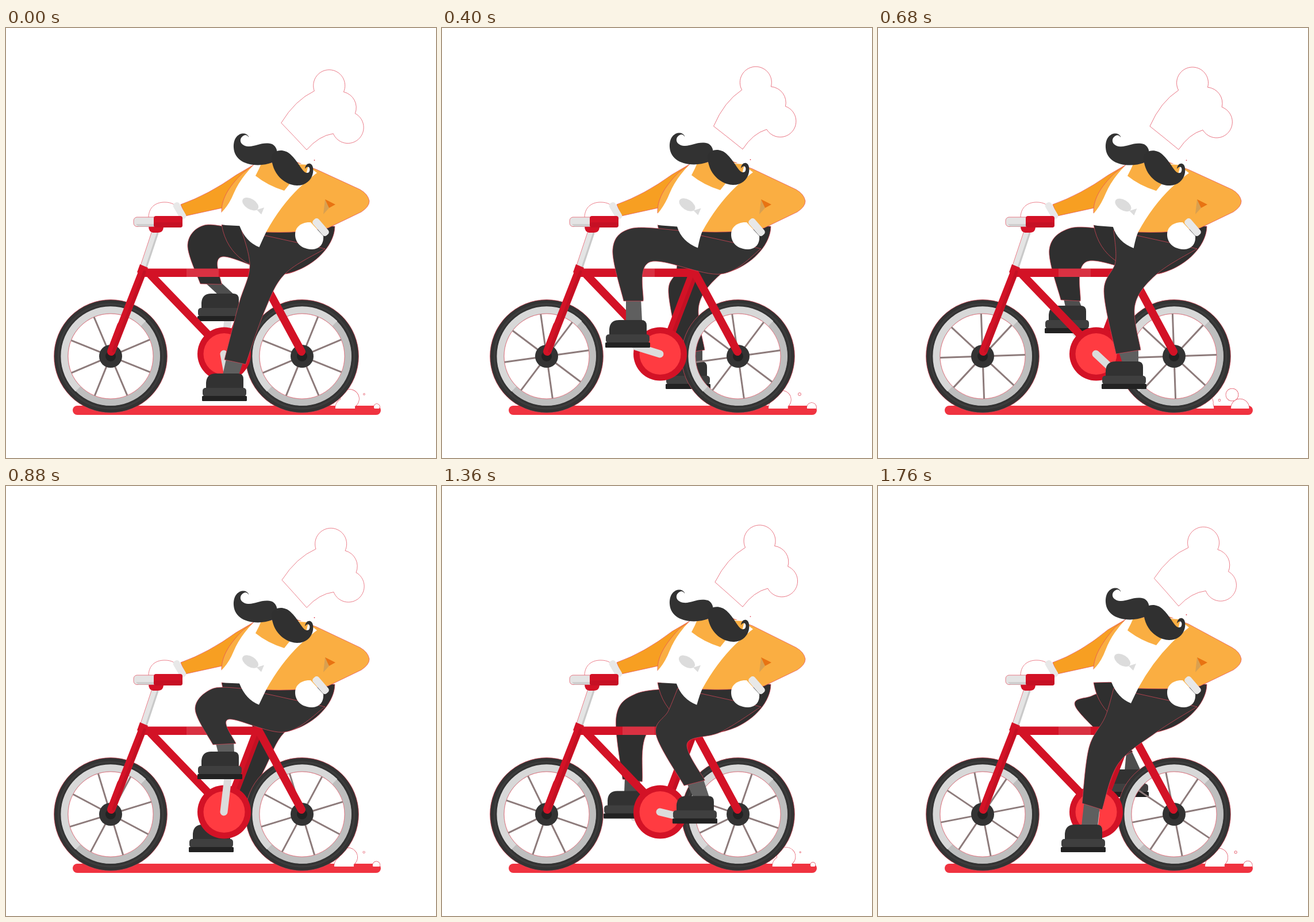
Animation of 748 by 748 pixels, one loop 1800 ms. Source, as an HTML page:

```html
<!DOCTYPE html>
<html lang="en">
<head>
<meta charset="utf-8">
<title>Cycling chef</title>
<style>
  html, body { margin: 0; width: 100%; height: 100%; overflow: hidden; background: #fff; }
  svg { display: block; width: 100vw; height: 100vh; }
  .line { stroke: #e2485a; stroke-width: .7; }
  .tube { fill: none; stroke: #d31226; stroke-linecap: round; }
  .shade { fill: none; stroke: #b90f22; stroke-linecap: round; opacity: .6; }
  .crank { stroke: #dcdcdc; stroke-width: 13; stroke-linecap: round; }
</style>
</head>
<body>
<svg viewBox="0 0 748 748">
  <defs>
    <clipPath id="floor"><path d="M0 0H748V662H0Z"/></clipPath>
    <g id="wheel">
      <circle r="92" fill="none" stroke="#333" stroke-width="13"/>
      <circle r="91" fill="none" stroke="#3d3d3d" stroke-width="3"/>
      <circle r="98.4" fill="none" class="line"/>
      <circle r="80" fill="none" stroke="#bebebe" stroke-width="12"/>
      <path d="M57 -57A80 80 0 1 0 -57 57" fill="none" stroke="#d8d8d8" stroke-width="12"/>
      <circle r="74" fill="none" class="line"/>
    </g>
    <g id="shoe">
      <path d="M-32 -18V-32Q-31 -48 -15 -48H24Q33 -48 33 -38V-18Z" fill="#323232"/>
      <rect x="-38" y="-23" width="76" height="15" rx="5" fill="#3f3f3f"/>
      <rect x="-39" y="-9" width="78" height="9" rx="1.5" fill="#222"/>
    </g>
  </defs>

  <rect x="116" y="657" width="536" height="16" rx="8" fill="#f03340"/>
  <g id="dust" clip-path="url(#floor)"></g>

  <g id="far"></g>

  <use href="#wheel" x="182" y="571"/>
  <use href="#wheel" x="515" y="571"/>
  <g id="spokes" stroke="#8d7b7b" stroke-width="3"></g>
  <g fill="#333">
    <circle cx="182" cy="571" r="20"/><circle cx="515" cy="571" r="20"/>
    <g fill="#222"><circle cx="182" cy="571" r="9"/><circle cx="515" cy="571" r="9"/></g>
  </g>

  <path d="M260 355L240 415" stroke="#e4e4e4" stroke-width="12"/>
  <path d="M264 356L244 416" stroke="#c9c9c9" stroke-width="3"/>
  <path d="M254 353L234 413" class="line"/>
  <path d="M252 430L378 561" class="tube" stroke-width="14"/>
  <path d="M437 428L388 556" class="tube" stroke-width="16"/>
  <path d="M441 430L392 558" class="shade" stroke-width="6"/>
  <path d="M441 428L514 563" class="tube" stroke-width="14"/>
  <rect x="238" y="418.500" width="208" height="14.500" fill="#d31226"/>
  <rect x="314" y="418.500" width="56" height="14.500" fill="#fff" opacity=".13"/>
  <path d="M239 420L183 563" class="tube" stroke-width="14" style="stroke-linecap:butt"/>
  <path d="M233 411L247 417 242 430 228 425Z" fill="#d31226"/>
  <path d="M200 518L183 563" class="tube" stroke-width="14"/>
  <path d="M241 424L187 562" class="shade" stroke-width="5"/>
  <circle cx="379.500" cy="567" r="46.500" fill="#d31226"/>
  <circle cx="379.500" cy="567" r="36" fill="#ff3b41"/>

  <path id="farArm" fill="#f79f22" class="line"/>
  <path d="M375 342L452 340 572 345C572 380 532 420 484 428C430 422 385 400 375 342Z" fill="#2f2f2f" class="line"/>
  <g id="near"></g>

  <path id="torso" fill="#faae42" class="line"/>
  <path d="M555 298L562 313 552 324Z" fill="#d9a050"/>
  <path d="M555 298L573 307 562 313Z" fill="#e87312"/>
  <path id="apron" fill="#fff"/>
  <path id="bib" fill="#faae42"/>
  <g id="fish" fill="#dcdcdc">
    <ellipse cx="425" cy="306" rx="15.500" ry="9" transform="rotate(32 425 306)"/>
    <path d="M436 316L449 312 444 324Z"/>
  </g>

  <path d="M503 359C503 344 517 337 530 338L552 362C553 378 543 385 531 385C514 384 503 374 503 359Z" fill="#fff"/>
  <rect x="530" y="340" width="35" height="13" rx="5" transform="rotate(49 547.500 346.500)" fill="#e8e8e8"/>

  <path d="M248 330C248 312 260 303 276 303C288 303 296 308 300 314L303 330Z" fill="#fff" class="line"/>
  <rect x="286" y="312" width="32" height="12" rx="5" transform="rotate(60 302 318)" fill="#e8e8e8"/>
  <path d="M248 345H274Q274 356 264 356H258Q248 356 248 345Z" fill="#d31226"/>
  <rect x="222" y="329" width="45" height="16.500" rx="6" fill="#e4e4e4" class="line"/>
  <path d="M226 341H258V345.500H230Z" fill="#cfcfcf"/>
  <rect x="257" y="327" width="50" height="20" rx="4" fill="#d31226"/>
  <rect x="257" y="338" width="50" height="9" rx="4" fill="#b90f22" opacity=".5"/>

  <g id="face">
    <path d="M422 189C418 179 395 181 396 208C398 240 440 243 463 234C475 224 474 208 463 202C446 197 434 207 421 206C408 205 404 194 412 188C416 185 420 186 422 190Z" fill="#323232"/>
    <path d="M462 224C462 240 470 263 495 272C520 280 537 262 534 243C532 232 521 234 520 245C526 237 531 244 527 251C517 257 512 236 495 220C482 208 464 213 462 224Z" fill="#303030"/>
    <circle cx="536.500" cy="230" r=".9" fill="#e2485a"/>
  </g>
  <path id="hat" class="line" fill="#fff" d="M480 164Q502 188 523 212Q545 188 570 185A27.500 27.500 0 1 0 609 151A28 28 0 0 0 590 113A27.500 27.500 0 1 0 539 110Q505 125 480 164Z"/>
</svg>

<script>
const $ = id => document.getElementById(id);
const LOOP = 1800, STEP = 40, TURN = 600, BOB = 300, PUFF = 450;

// time, then x,y of: thigh, knee, cuff front, cuff back, knee hollow, shoe
const NEAR = [
  [0, 424,415, 405,480, 380,577, 417,585, 450,492, 380,649],
  [80, 413,407, 393,458, 414,567, 457,560, 447,482, 428,628],
  [240, 372,372, 348,405, 412,470, 442,462, 402,412, 432,541],
  [280, 358,353, 329,388, 360,450, 400,448, 387,406, 372,510],
  [360, 335,339, 306,378, 324,459, 363,460, 371,399, 329,531],
  [400, 328,349, 297,385, 316,475, 350,475, 362,407, 323,556],
  [480, 345,368, 320,415, 322,525, 357,532, 372,430, 325,602],
  [560, 395,402, 367,455, 355,552, 390,563, 418,483, 357,637]
];
const FAR = [
  [0, 345,343, 316,377, 338,445, 375,446, 376,398, 372,510],
  [80, 335,348, 298,385, 318,473, 352,475, 364,406, 329,531],
  [180, 345,368, 312,410, 318,520, 352,525, 370,430, 322,590],
  [280, 430,430, 412,500, 372,572, 405,582, 450,492, 357,637],
  [360, 415,430, 403,490, 403,575, 440,578, 462,485, 414,641],
  [400, 408,420, 394,460, 414,567, 457,560, 447,482, 428,628],
  [560, 372,365, 344,385, 428,470, 443,462, 400,410, 432,541]
];
// time, rise, hat tilt, apron sway
const BODY = [
  [0, 0, -1.5, .1], [60, 1, -7.5, .75], [100, -1, -9.7, 1],
  [180, -3.5, -5, .5], [260, -6, .5, 0], [280, -1, 0, 0]
];
// age, then x,y,radius of the base and of the top bubble
const CLOUD = [
  [.3, 552,661,14, 552,650,10], [.467, 566,661,16, 566,652,14],
  [1, 590,661,17, 598,645,16], [1.467, 627,661,16, 614,638,12],
  [1.578, 634,661,15, 619,638,8.5], [1.889, 643,660,8, 622,637,2],
  [2, 645,659,5, 623,637,1], [2.15, 646,659,0, 624,637,0]
];

// Smooth periodic interpolation between rows
function cycle(rows, period, time) {
  const t = time % period, n = rows.length;
  const row = i => rows[(i + n) % n];
  const when = i => row(i)[0] + Math.floor(i / n) * period;
  let i = n - 1;
  while (rows[i][0] > t) i--;
  const t0 = when(i), span = when(i + 1) - t0, u = (t - t0) / span;
  return row(i).slice(1).map((a, k) => {
    const at = j => row(j)[k + 1];
    const b = at(i + 1);
    const ma = (b - at(i - 1)) / (when(i + 1) - when(i - 1)) * span;
    const mb = (at(i + 2) - a) / (when(i + 2) - t0) * span;
    return a + u * (ma + u * (3 * (b - a) - 2 * ma - mb + u * (2 * (a - b) + ma + mb)));
  });
}

function ramp(rows, t) {
  if (t < rows[0][0] || t >= rows.at(-1)[0]) return null;
  const i = rows.findIndex(r => r[0] > t), a = rows[i - 1], b = rows[i];
  const u = (t - a[0]) / (b[0] - a[0]);
  return a.slice(1).map((v, k) => v + (b[k + 1] - v) * u);
}

// Bezier segments that pass through every point
function curve(pts) {
  let d = '';
  for (let i = 0; i < pts.length - 1; i++) {
    const p = pts[i], q = pts[i + 1], o = pts[i - 1] || p, r = pts[i + 2] || q;
    d += 'C' + [p[0] + (q[0] - o[0]) / 6, p[1] + (q[1] - o[1]) / 6,
                q[0] - (r[0] - p[0]) / 6, q[1] - (r[1] - p[1]) / 6, ...q].map(v => v.toFixed(2));
  }
  return d;
}

function makeLeg(id, cloth, sock) {
  $(id).innerHTML = `<line class="crank" x1="379" y1="567"/><path fill="${sock}"/>
    <use href="#shoe"/><path fill="${cloth}" class="line"/>`;
  const [crank, ankle, shoe, leg] = $(id).children;
  return v => {
    const [thigh, knee, front, back, hollow, foot] =
      [0, 2, 4, 6, 8, 10].map(k => [v[k], v[k + 1]]);
    const [x, y] = foot;
    const dx = x + 14 - 379, dy = y - 2 - 567, k = Math.min(1, 56 / Math.hypot(dx, dy));
    crank.setAttribute('x2', 379 + dx * k);
    crank.setAttribute('y2', 567 + dy * k);
    ankle.setAttribute('d', `M${front[0] + 4} ${front[1] - 6}L${back[0] - 4} ${back[1] - 6}` +
      `L${x + 25} ${y - 46}H${x - 3}Z`);
    shoe.setAttribute('transform', `translate(${x} ${y})`);
    leg.setAttribute('d', 'M410 352' + curve([[410, 352], thigh, knee, front]) +
      `L${back}` + curve([back, hollow, [485, 428], [555, 384]]) + 'Z');
  };
}

const nearLeg = makeLeg('near', '#333', '#5f5f5f');
const farLeg = makeLeg('far', '#2f2f2f', '#4e4e4e');

$('spokes').innerHTML = [182, 515].map(x => `<g transform="translate(${x} 571)"><g>` +
  [0, 45, 90, 135].map(a => `<path d="M-74 0H74" transform="rotate(${a})"/>`).join('') +
  '</g></g>').join('');
const spins = [...$('spokes').children].map(g => g.firstChild);

function drawBody(t) {
  const [b, tilt, s] = cycle(BODY, BOB, t);
  const h = b / 2;
  $('face').setAttribute('transform', `translate(0 ${b})`);
  $('hat').setAttribute('transform', `translate(0 ${h - s * .6}) rotate(${tilt} 523 212)`);
  $('fish').setAttribute('transform', `translate(${s * 1.5} ${h + s * 2})`);
  $('farArm').setAttribute('d',
    `M436 ${235 + b}L400 ${256 + b}Q352 290 304 307L312 327L385 311L420 ${270 + b}Z`);
  $('torso').setAttribute('d',
    `M434 ${236 + b}L412 ${252 + b}C385 278 374 300 375 322L400 340L452 ${355 + h}` +
    `Q500 ${357 + h} 535 351L560 348L618 320Q632 311 632 301Q630 289 616 281L540 ${246 + b}` +
    `L505 ${233 + b}Z`);
  $('apron').setAttribute('d',
    `M432 ${237 + b}Q407 ${262 + b} 396 ${288 + h}Q382 322 ${356 + 4 * s} ${333 + h + 3 * s}` +
    `Q370 ${342 + h + s} 382 ${343 + h + s}L${406 + 3 * s} ${344 + h + 2 * s}` +
    `Q417 ${372 + h} ${440 + 5 * s} ${381 + h + 2 * s}Q449 ${362 + h} 453 ${354 + h}` +
    `Q488 ${290 + h} 541 ${252 + b}L520 ${236 + b}Z`);
  $('bib').setAttribute('d',
    `M445 ${234 + b}Q440 ${246 + b} 434 ${257 + b}Q455 ${274 + b} 484 ${283 + b}` +
    `L496 ${268 + b}L520 ${264 + b}L526 ${238 + b}Z`);
}

function drawDust(t) {
  const p = t / PUFF % 1;
  const rings = [];
  for (const age of [p, p + 1, p + 2]) {
    const c = ramp(CLOUD, age);
    if (c) rings.push(c.slice(0, 3), c.slice(3));
  }
  if (p > .4 && p < .65) rings.push([594, 647.5, 2.2 - (p - .4) * 6]);
  const circles = style => rings.map(([x, y, r]) =>
    `<circle cx="${x}" cy="${y}" r="${Math.max(0, r)}" ${style}/>`).join('');
  $('dust').innerHTML = circles('fill="none" stroke="#e2485a" stroke-width="1.4"') +
    circles('fill="#fff"');
}

function draw(t) {
  nearLeg(cycle(NEAR, TURN, t));
  farLeg(cycle(FAR, TURN, t));
  spins.forEach(g => g.setAttribute('transform', `rotate(${-23 - t * .3})`));
  drawBody(t);
  drawDust(t);
}

const start = performance.now();
function tick() {
  const t = (performance.now() - start) % LOOP;
  draw(Math.floor(t / STEP) * STEP);
  requestAnimationFrame(tick);
}
tick();
</script>
</body>
</html>
```
